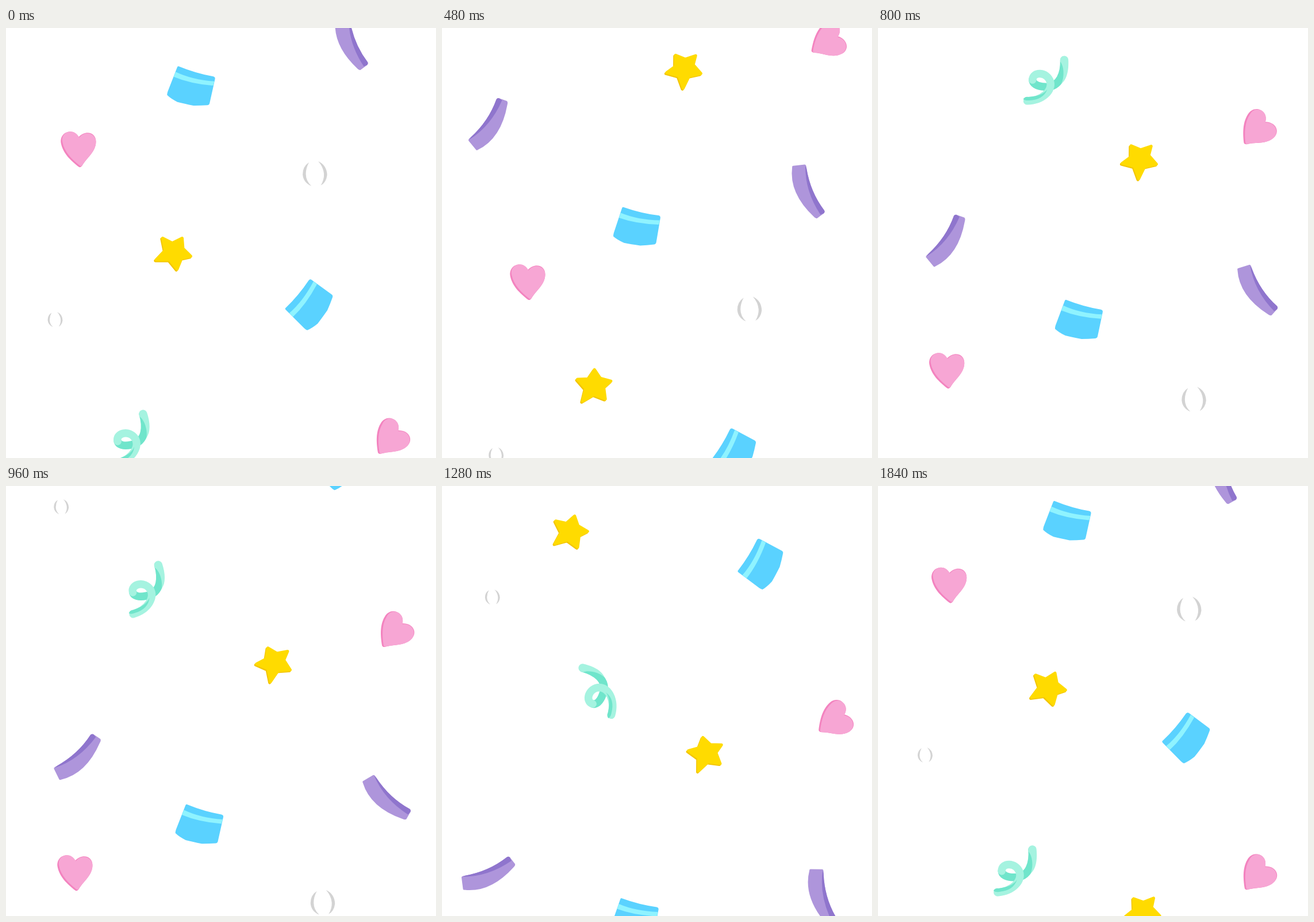
An HTML page with a canvas for the animation above (1920 ms loop, 748 px wide and 748 px high).

```html
<!DOCTYPE html>
<html>
<head>
<meta charset="utf-8">
<title>Falling confetti</title>
<style>
  html, body { margin: 0; height: 100%; overflow: hidden; background: #fff; }
  canvas { display: block; }
</style>
</head>
<body>
<canvas id="stage" width="748" height="748"></canvas>
<script>
const ctx = document.getElementById('stage').getContext('2d');
const STEP = 80, STEPS = 24, ABOVE = -60;

const fill = (color, d) => ({ color, path: new Path2D(d) });
const line = (color, width, d) => ({ color, width, path: new Path2D(d) });

// Each shape is drawn around its own origin.
const paper = { origin: [325.75, 103], parts: [
  fill('#5ad2ff', 'M302 69Q332 81 362 86Q366 87 365 91L356 133Q355 136 352 136Q340 137 328 137Q312 134 300 131Q288 125 282 119Q282 116 283 113L299 71Q300 68 302 69Z'),
  fill('#8ff3ff', 'M296.5 78.5Q325 92 364 94.5L362 102Q322 99 293 87Z')
] };

const heart = { origin: [126.5, 211.5], parts: [
  fill('#f383bf', 'M127 190C122 181 113 179 106 182C98 185 95 193 96 200C99 218 113 231 127 242Q130 244 133 240C141 226 157 216 157 198C157 183 140 177 127 190Z'),
  fill('#f7a6d4', 'M128 191C122 181 114 179 107 182C99 185 97 193 99 200C102 216 116 230 129 240Q131 242 133.5 239C141 226 157 216 157 198C156 184 139 178 128 191Z')
] };

const starPath = 'M-20-24L-3-16L14-25L16-7L30 6L14 10L7 29L-7 13L-30 14L-15-3Z';
const star = { origin: [0, 0], parts: [
  { ...line('#f3c500', 5, starPath), solid: true, shift: [-.9, .9] },
  { ...line('#ffdb00', 5, starPath), solid: true, shift: [.7, -.9] }
] };

const strip = { origin: [653.25, 364.75], parts: [
  fill('#ae95db', 'M634 317L654 319Q657 319 656 326Q654 368 671 404Q672 407 669 409L656 415Q653 415 651 411Q617 362 632 319Q632 317 634 317Z'),
  fill('#8f75cd', 'M655 321Q645 365 663 410L669 409Q672 407 671 404Q654 368 656 326Z')
] };

const curl = { origin: [238.5, 177], parts: [
  line('#70e5cb', 13.5, 'M269.5 140C271 160 266 189 238 188C224 188 217 183 216.5 177'),
  fill('#a5f3e0', 'M263 143C261 130 276 130 277 139C279 157 276 174 267 181C272 169 270 150 263 143Z'),
  line('#a5f3e0', 13.5, 'M216.5 177C216 162 241 161 247.5 179C252 193 237 212 209 214'),
  fill('#70e5cb', 'M202 211Q205 206 211 207Q236 204 243 192Q237 211 212 213Q205 214 202 211Z')
] };

const disc = { origin: [537, 254], parts: [
  fill('#d3d3d3', 'M527 234Q516 241 516 255Q517 269 531 275Q521.5 266 521.5 254Q521.5 244 527 234ZM543 232Q558 239 558.5 256Q557 269 547.5 274Q553.5 264 553 254Q552 242 543 232Z')
] };

// A steady drift with a sine on top, highest at step `peak`.
const wave = (base, size = 0, peak = 0, period = 12, drift = 0) =>
  k => base + drift * k + size * Math.cos(2 * Math.PI * (k - peak) / period);

const piece = (shape, y, speed, x, turn, scale = 1) => ({ shape, y, speed, x, turn, scale });
const pieces = [
  piece(paper, 101, 40.6, wave(329, 15.8, 8.4, 12, 1.2), wave(-1, 1.5)),
  piece(paper, 479.2, 43.2, wave(529, 9.2, 8.6, 12, -4), wave(-70, 4.7, -1)),
  piece(heart, 211, 38.5, wave(139, 15.8, 4.85, 12, -.5), wave(0)),
  piece(heart, -206.3, 38.4, wave(677.4, 18.5, 2.55, 12, -.6), wave(52.7, 9.9, 5.6)),
  piece(star, 391, 38.8, wave(271.9, 31.4, -2.33, 16, 3.84), wave(-13, 17, 1)),
  piece(star, -164, 39.4, wave(424, 18.6, -3.6, 16, 2), wave(-53, 12, 0, 16)),
  piece(strip, 24.5, 43, wave(613.5, 11.5, -6.7, 16, 3.8), wave(-20, 16, -1.5, 9)),
  piece(strip, -139.6, 50.7, wave(124, 35, -3.8, 16, -3), wave(-121.8, 18.8, 0, 16)),
  piece(curl, -353.7, 44.5, wave(308.7, 49, 7.16, 12, -2.2), wave(-34, 37, -1.8)),
  piece(disc, 253.8, 39.25, wave(539.5, 10.3, -4.6, 16, .1), wave(0)),
  piece(disc, 507.4, 39.25, wave(86.5, 9.6, 4.3, 16), wave(0), .61)
];

const mod = (a, n) => ((a % n) + n) % n;

function drawPiece({ shape, y, speed, x, turn, scale }, step) {
  const entry = (ABOVE - y) / speed;
  const k = entry + mod(step - entry, STEPS);
  for (const { color, path, width, solid, shift = [0, 0] } of shape.parts) {
    ctx.save();
    ctx.translate(x(k) + shift[0], y + speed * k + shift[1]);
    ctx.rotate(turn(k) * Math.PI / 180);
    ctx.scale(scale, scale);
    ctx.translate(-shape.origin[0], -shape.origin[1]);
    ctx.fillStyle = ctx.strokeStyle = color;
    ctx.lineWidth = width || 1;
    ctx.lineCap = ctx.lineJoin = 'round';
    if (!width || solid) ctx.fill(path);
    if (width) ctx.stroke(path);
    ctx.restore();
  }
}

function draw() {
  const step = Math.floor(performance.now() / STEP) % STEPS;
  ctx.fillStyle = '#fff';
  ctx.fillRect(0, 0, 748, 748);
  pieces.forEach(p => drawPiece(p, step));
  requestAnimationFrame(draw);
}
draw();
</script>
</body>
</html>
```
